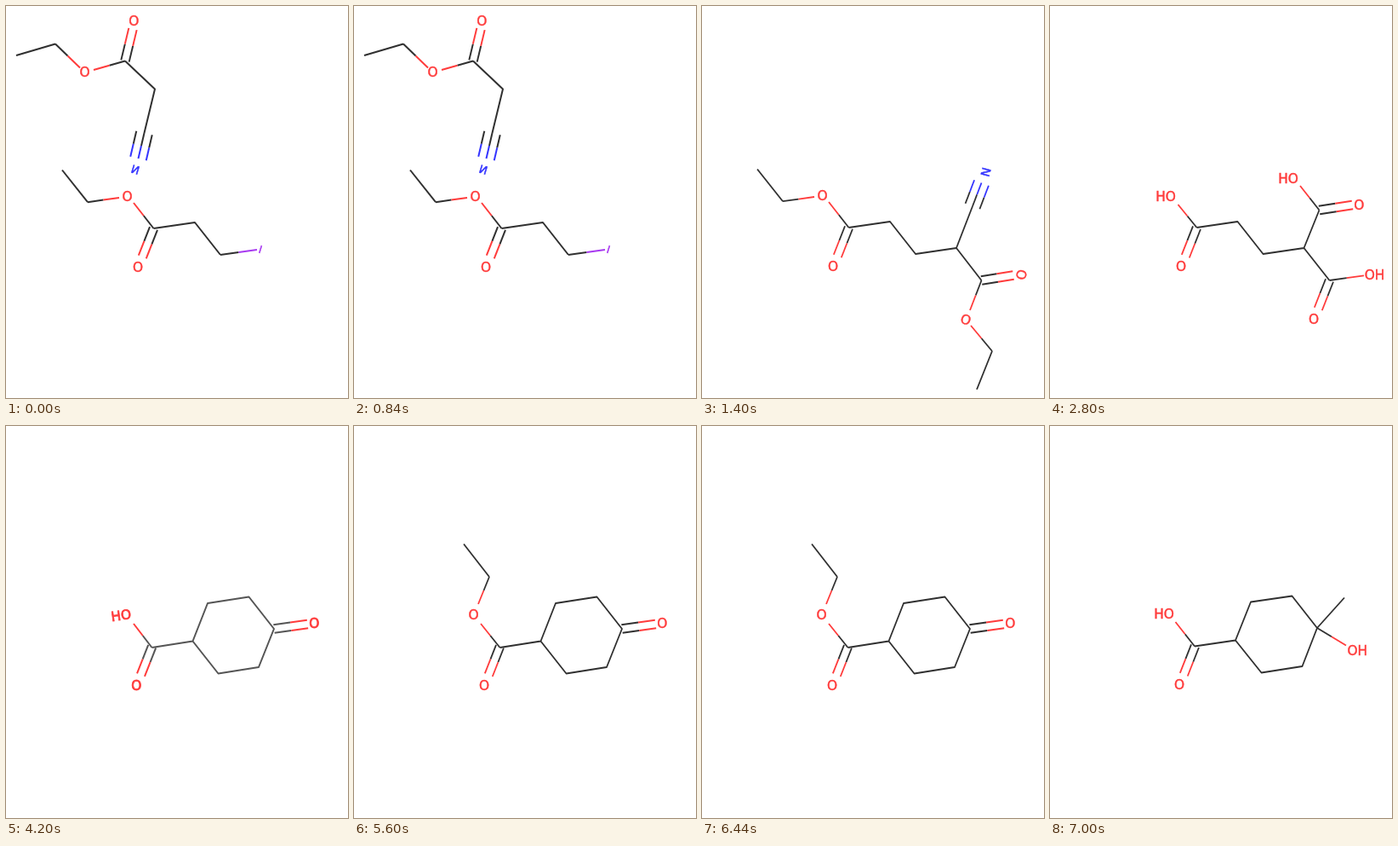
These frames come from a looping animation (402 by 460 pixels, 8 s). An HTML page:

```html
<!DOCTYPE html>
<html lang="en">
<head>
<meta charset="utf-8">
<title>Reaction sequence</title>
<style>
html, body { margin: 0; width: 100%; height: 100%; overflow: hidden; background: #fff; }
svg { display: block; width: 402px; height: 460px; }
path { fill: none; }
text { font-family: "DejaVu Sans", sans-serif; text-anchor: middle; }
</style>
</head>
<body>
<svg id="stage" viewBox="0 0 402 460"></svg>
<script>
const RED = '#ff3b3b', BLUE = '#3434ff', PURPLE = '#a83af0';
const NS = 'http://www.w3.org/2000/svg';
const stage = document.getElementById('stage');

function add(parent, tag, attrs) {
  const el = document.createElementNS(NS, tag);
  for (const key in attrs) el.setAttribute(key, attrs[key]);
  return parent.appendChild(el);
}

function scene(ink = '#303030', width = 1.8, bold = .45) {
  const g = add(stage, 'g', { visibility: 'hidden', 'stroke-width': width });
  const api = {
    // Carbon skeleton
    chain(d) { add(g, 'path', { d: 'M' + d, stroke: ink, 'stroke-linejoin': 'round' }); return api; },
    // Bond to a hetero atom: first half dark, second half coloured; one line per offset
    bond(x1, y1, x2, y2, color = RED, offsets = [0]) {
      const len = Math.hypot(x2 - x1, y2 - y1);
      const nx = (y1 - y2) / len, ny = (x2 - x1) / len;
      for (const o of offsets) {
        const ax = x1 + nx * o, ay = y1 + ny * o, bx = x2 + nx * o, by = y2 + ny * o;
        const mx = (ax + bx) / 2, my = (ay + by) / 2;
        add(g, 'path', { d: `M${ax} ${ay}L${mx} ${my}`, stroke: ink });
        add(g, 'path', { d: `M${mx} ${my}L${bx} ${by}`, stroke: color });
      }
      return api;
    },
    double(x1, y1, x2, y2) { return api.bond(x1, y1, x2, y2, RED, [-4.8, 4.8]); },
    // Atom symbol centred on x, y
    label(str, x, y, turn = 0, color = RED, size = 15.4, flip = 1) {
      add(g, 'text', {
        transform: `translate(${x} ${y}) rotate(${turn}) scale(${flip} 1)`,
        y: size * .365, 'font-size': size, fill: color, stroke: color, 'stroke-width': bold
      }).textContent = str;
      return api;
    }
  };
  return api;
}

const acidO = (s, dx = 0, dy = 0) =>
  s.double(172.5 + dx, 260 + dy, 159.3 + dx, 293.5 + dy).label('O', 154 + dx, 305.3 + dy);

const ethylEster = (s, dx, dy) =>
  acidO(s, dx, dy)
    .chain(`${65 + dx} ${191.5 + dy}L${95 + dx} ${229.2 + dy}`)
    .bond(95 + dx, 229.2 + dy, 132 + dx, 224 + dy)
    .bond(172.5 + dx, 260 + dy, 149 + dx, 230 + dy)
    .label('O', 141.5 + dx, 222.3 + dy);

const ring = '171.5 260L219.5 252.5L237 208L285.5 200.5L315 238L297 283L249.5 290.5L219.5 252.5';

const nitrile = scene('#303030', 2);
ethylEster(nitrile, 1, 1)
  .chain('173.5 261L222 254L252 292')
  .bond(252, 292, 295, 286, PURPLE)
  .label('I', 299, 285.5, 17, PURPLE, 12, -1)
  .chain('12 58L58 44.5')
  .bond(58, 44.5, 87, 72.5)
  .bond(140, 64.5, 103, 75)
  .label('O', 92.5, 77.3)
  .double(140, 64.5, 149, 27)
  .label('O', 150.3, 17)
  .chain('140 64.5L175 97.5L162.5 149')
  .bond(162.5, 149, 155.5, 179, BLUE, [-9.5, 0, 9.5])
  .label('N', 152, 192, 17, BLUE, 13, -1);

const diester = scene();
ethylEster(diester, 0, 0)
  .chain('172.5 260L221 253L251 291L299 284L328.5 322')
  .chain('299 284L318 235')
  .bond(318, 235, 328.5, 207.5, BLUE, [-9, 0, 9])
  .label('N', 333.5, 195, 105, BLUE, 14)
  .double(328.5, 322, 366, 316)
  .label('O', 375.5, 315.3, 98)
  .bond(328.5, 322, 315, 357)
  .bond(341, 405, 316, 375)
  .label('O', 310, 367.7, 20)
  .chain('341 405L323 450');

acidO(scene(), 0, .2)
  .chain('172.5 260L220.5 253L250.5 291L298.5 284L316.5 239.5M298.5 284L328.5 322')
  .bond(172.5, 260, 150.5, 233)
  .label('HO', 136, 223.3)
  .bond(316.5, 239.5, 294, 211)
  .label('HO', 280, 202.2)
  .double(316.5, 239.5, 355.5, 233.5)
  .label('O', 363.4, 232.9)
  .bond(328.5, 322, 369, 316.3)
  .label('OH', 381.5, 315.5)
  .double(328.5, 322, 315.3, 355.5)
  .label('O', 310, 367.5);

acidO(scene('#555', 2, .8), -.8, -1.3)
  .chain(ring)
  .bond(171.5, 260, 150, 232)
  .label('HO', 135.2, 222, -8)
  .double(315, 238, 354.5, 232.5)
  .label('O', 362.3, 231.3);

acidO(scene(), -1, -1.3)
  .chain(ring)
  .chain('129 138.5L159 177')
  .bond(159, 177, 146, 209)
  .bond(171.5, 260, 149, 232)
  .label('O', 140.5, 221.4)
  .double(315, 238, 354.5, 232.5)
  .label('O', 362.3, 231.3);

acidO(scene(), -2, -1.8)
  .chain('170 258.5L218 251.5L236 206.5L284.5 199.5L314 237L296.5 282L248.5 289.5L218 251.5')
  .chain('314 237L346 201.5')
  .bond(170, 258.5, 147.5, 230)
  .label('HO', 134, 220.8)
  .bond(314, 237, 348, 257.5)
  .label('OH', 361.3, 263.7);

const HOLD = 1400, LOOP = 8000;
const scenes = [...stage.children];
const start = performance.now();

function draw(now) {
  const t = Math.max(0, now - start) % LOOP;
  const active = Math.floor(t / HOLD);
  scenes.forEach((g, i) => g.setAttribute('visibility', i === active ? 'visible' : 'hidden'));
  requestAnimationFrame(draw);
}
draw(start);
</script>
</body>
</html>
```
